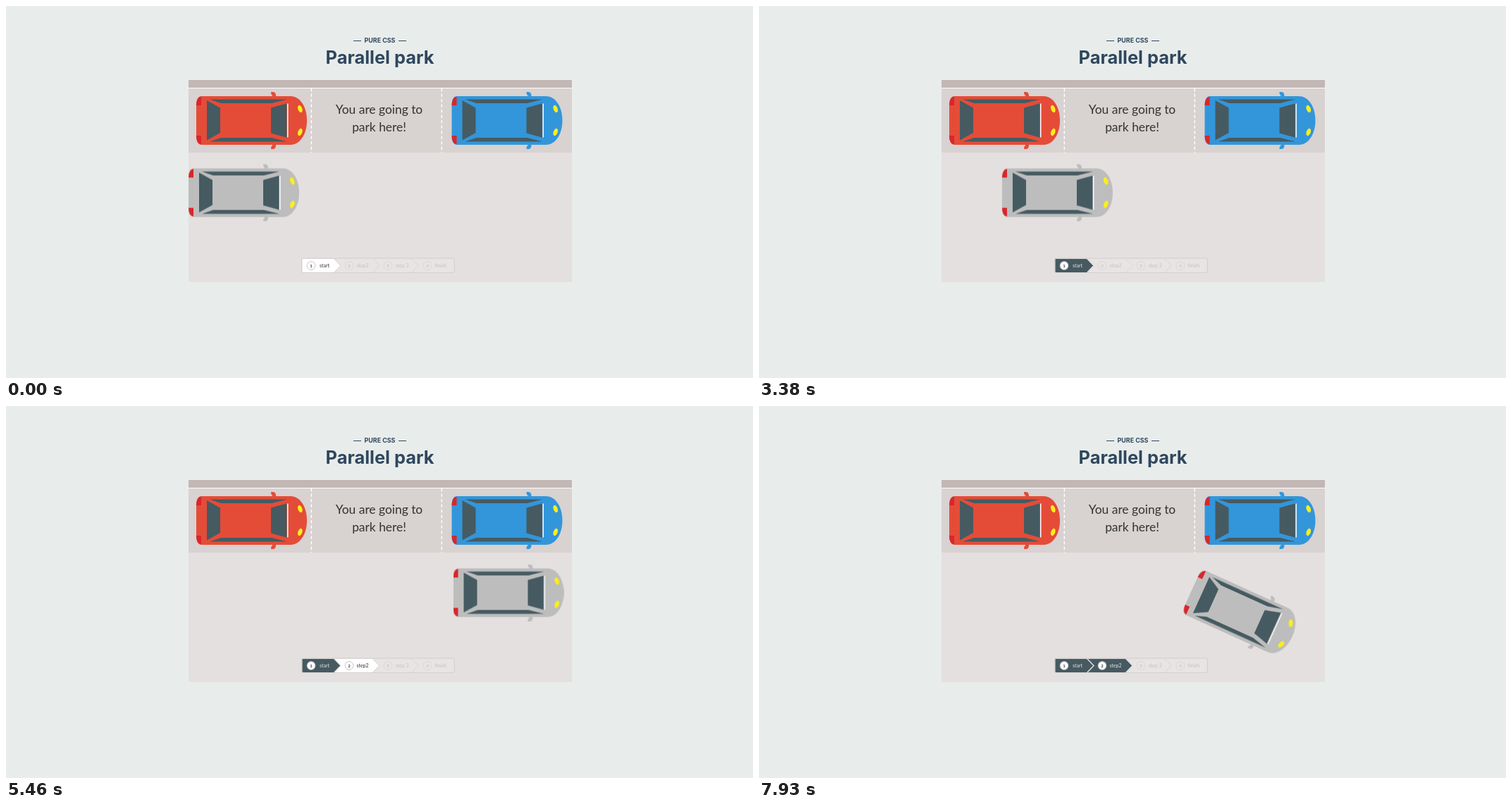
Animation of 1060x528 px, one loop 8000 ms. Source, as an HTML page:

```html
<!DOCTYPE html>
<html lang="en">
<head>
<meta charset="utf-8">
<title>Parallel park</title>
<style>
  html, body { margin: 0; width: 100%; height: 100%; overflow: hidden; background: #e8edeb; }
  svg { display: block; width: 1060px; height: 528px; }
  text { text-anchor: middle; font-family: Lato, sans-serif; }
  .title { font: 700 25.4px Inter, sans-serif; fill: #2f475e; }
  .kicker { font: 700 8.9px Inter, sans-serif; fill: #2f475e; }
  .sign { font-size: 17.4px; fill: #333; }
  .label { font-size: 7px; fill: #c6c2c1; }
  .digit { font-size: 6px; font-weight: 700; fill: #c6c2c1; }
  .shape { fill: #e7e4e3; stroke: #e1dddc; stroke-width: 1; }
  .badge { fill: #e7e4e3; stroke: #d8d4d3; stroke-width: .8; }
  .active .shape { fill: #fff; }
  .active .label, .active .digit { fill: #333; }
  .active .badge { fill: #fff; stroke: #b5b5b5; }
  #turn { transform-origin: -4.5px -15px; }
</style>
</head>
<body>
<svg viewBox="0 0 1060 528">
  <defs>
    <g id="car">
      <g fill="currentColor">
        <path id="mirror" d="M106-6H109Q113-6 113 0V1H108V-1Q106-2 106-6Z"/>
        <use href="#mirror" transform="matrix(1 0 0 -1 0 69)"/>
        <path d="M8 0H134C147 0 157 15 157 34.5S147 69 134 69H8Q0 69 0 56V13Q0 0 8 0Z"/>
      </g>
      <g id="half">
        <path d="M7 .5V13H0Q0 2 7 .5Z" fill="#d9262b"/>
        <path d="M19 4.5H129L107 10H35Z" fill="#465a61"/>
        <ellipse cx="147.3" cy="18" rx="3" ry="5.4" transform="rotate(-20 147.3 18)" fill="#fcee1c"/>
      </g>
      <use href="#half" transform="matrix(1 0 0 -1 0 69)"/>
      <path d="M15 6L34 16.5V52L15 62.5ZM106 16.5L128.5 10.3V58.7L106 52.5Z" fill="#465a61"/>
      <path d="M129.7 10.5V58.5" stroke="#fff" stroke-width="1.5"/>
    </g>
  </defs>

  <path d="M493 49.5H504M557 49.5H568" stroke="#2f475e"/>
  <text class="kicker" x="530.5" y="52">PURE CSS</text>
  <text class="title" x="530.5" y="82">Parallel park</text>

  <rect x="259" y="105" width="544" height="287" fill="#e4e0df"/>
  <rect x="259" y="105" width="544" height="11" fill="#c3b7b6"/>
  <rect x="259" y="116" width="544" height="92" fill="#d8d2d1"/>
  <path d="M259 116.5H803" stroke="#fff"/>
  <path d="M433.3 117V208M618.3 117V208" stroke="#fff" stroke-width="1.4" stroke-dasharray="4.5 3"/>
  <text class="sign" x="529.5" y="153">You are going to</text>
  <text class="sign" x="529.5" y="178">park here!</text>

  <use href="#car" x="270" y="128" color="#e44c38"/>
  <use href="#car" x="632.5" y="128" color="#3396da"/>
  <g id="steps"></g>
  <g id="drive"><g id="turn"><use href="#car" color="#bdbdbd"/></g></g>
</svg>

<script>
const LOOP = 8000, TICK = 130;
const DARK = '#465a61';
const $ = id => document.getElementById(id);

const stepData = [
  { text: 'start', from: 420, to: 465, badge: 433, label: 452 },
  { text: 'step2', from: 466, to: 520, badge: 487, label: 506 },
  { text: 'step 3', from: 521, to: 575, badge: 542, label: 562 },
  { text: 'finish', from: 576, to: 636, badge: 598, label: 617, last: true }
];

function stepMarkup(s, i) {
  const tip = s.last ? '' : `L${s.to + 9.5} 368.5`;
  const tail = i ? `L${s.from + 9.5} 368.5` : '';
  return `<g id="step${i + 1}" class="${i ? '' : 'active'}">
    <path class="shape" d="M${s.from} 358.5H${s.to}${tip}L${s.to} 378.5H${s.from}${tail}Z"/>
    <circle class="badge" cx="${s.badge}" cy="368.5" r="5.9"/>
    <text class="digit" x="${s.badge}" y="370.6">${i + 1}</text>
    <text class="label" x="${s.label}" y="370.6">${s.text}</text></g>`;
}
$('steps').innerHTML = stepData.map(stepMarkup).join('') +
  '<rect x="419.5" y="358" width="217" height="20.5" rx="2" fill="none" stroke="#d3cfce"/>';

const animations = [];
function play(el, from, to, delay, duration, easing = 'ease', fill = 'forwards') {
  const anim = el.animate([from, to], { delay, duration, easing, fill });
  anim.pause();
  animations.push(anim);
}

function recolour(step, colours, delay, duration) {
  for (const [part, [from, to]] of Object.entries(colours))
    play($(step).querySelector('.' + part), { fill: from }, { fill: to }, delay, duration);
}

const finish = { shape: ['#fff', DARK], label: ['#333', '#dfe4e5'] };
recolour('step1', finish, 1340, 480);
recolour('step2', {
  shape: ['#e7e4e3', '#fff'], label: ['#c6c2c1', '#333'],
  digit: ['#c6c2c1', '#333'], badge: ['#e7e4e3', '#fff']
}, 5400, 50);
play($('step2').querySelector('.badge'), { stroke: '#d8d4d3' }, { stroke: '#b5b5b5' }, 5400, 50);
recolour('step2', finish, 6020, 480);

play($('drive'), { transform: 'translate(259px, 230.5px)' },
  { transform: 'translate(634.5px, 230.5px)' }, 2370, 3050, 'ease-in-out', 'both');
play($('turn'), { transform: 'rotate(0deg)' }, { transform: 'rotate(30deg)' },
  6660, 1814, 'ease-in-out', 'both');

const start = performance.now();
function draw(now) {
  const time = Math.max(0, now - start) % LOOP;
  const stepped = Math.floor(time / TICK) * TICK;
  for (const anim of animations) anim.currentTime = stepped;
  requestAnimationFrame(draw);
}
draw(start);
</script>
</body>
</html>
```
